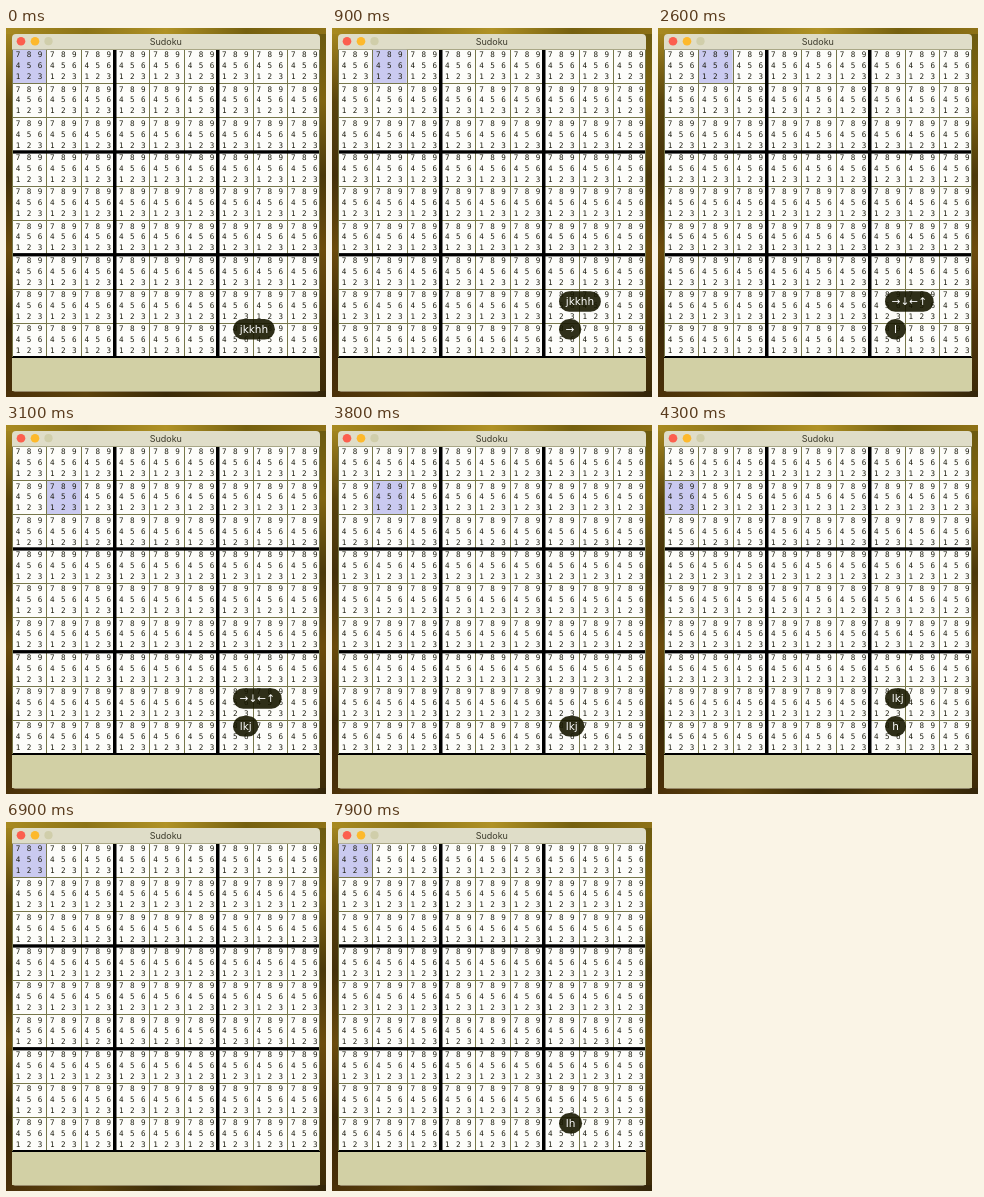
Write an HTML page with a canvas that moves like this. It is 320x369 px and loops after 8 s.

```html
<!DOCTYPE html>
<html lang="en">
<head>
<meta charset="utf-8">
<title>Sudoku</title>
<style>
  html, body { margin: 0; width: 100%; height: 100%; overflow: hidden; }
  canvas { display: block; }
</style>
</head>
<body>
<canvas id="stage" width="320" height="369"></canvas>
<script>
const ctx = document.getElementById('stage').getContext('2d');
const LOOP = 8000, HOLD = 1500, FADE = 300;
const PITCH_X = 34.4, PITCH_Y = 34.25;

// Each group of key presses shares one bubble: [key, time in ms].
const groups = [
  [...'jkkhh'].map(key => [key, -600]),
  [['→', 900], ['↓', 1150], ['←', 1400], ['↑', 1650]],
  [['l', 2400], ['k', 2700], ['j', 3000]],
  [['h', 4200], ['k', 4800]],
  [['l', 7400], ['h', 7700]]
];
const moves = {
  h: [-1, 0], j: [0, 1], k: [0, -1], l: [1, 0],
  '←': [-1, 0], '↓': [0, 1], '↑': [0, -1], '→': [1, 0]
};

function rect(x, y, w, h, fill) {
  ctx.fillStyle = fill;
  ctx.fillRect(x, y, w, h);
}

function dot(x, y, r, fill) {
  ctx.fillStyle = fill;
  ctx.beginPath();
  ctx.arc(x, y, r, 0, 2 * Math.PI);
  ctx.fill();
}

function text(str, x, y, font, fill, align = 'center') {
  ctx.font = font;
  ctx.fillStyle = fill;
  ctx.textAlign = align;
  ctx.textBaseline = 'alphabetic';
  ctx.fillText(str, x, y);
}

function gradient(x, y, ...colors) {
  const g = ctx.createLinearGradient(0, 0, x, y);
  colors.forEach((c, i) => g.addColorStop(i / (colors.length - 1), c));
  return g;
}

function drawBackdrop() {
  rect(0, 0, 160, 369, gradient(0, 369, '#a88a20', '#59440c', '#43300a', '#6a4b0c', '#3b2807', '#4a3009'));
  rect(160, 0, 160, 369, gradient(0, 369, '#6b5a10', '#80640f', '#4c390a', '#6c4b0c', '#503509', '#3b2a08'));
  rect(0, 0, 320, 6, gradient(320, 0, '#a88a20', '#8c7418', '#b09226', '#75600f', '#8d7116'));
  rect(0, 363, 320, 6, gradient(320, 0, '#4a3009', '#5d430c', '#3a2a08', '#553c0b', '#33250a'));
}

function drawWindow() {
  ctx.fillStyle = '#dfddc8';
  ctx.beginPath();
  ctx.roundRect(6, 6, 308, 357.5, [4, 4, 3, 3]);
  ctx.fill();
  rect(6, 330, 308, 33, '#d2d0a5');
  rect(6, 21, 308, 1, '#a9a786');
  dot(15, 13.2, 4.3, '#fc5f4e');
  dot(29, 13.2, 4.3, '#fdb92c');
  dot(42.5, 13.2, 4.1, '#d0ceaa');
  text('Sudoku', 159.8, 16.8, '9px Inter, sans-serif', '#3d3b2c');
}

function drawBoard([col, row]) {
  rect(6, 22, 308, 308, '#fdfdfa');
  rect(6.5 + col * PITCH_X, 21.8 + row * PITCH_Y, 33.8, 33.6, '#cacaf0');
  for (let i = 1; i < 9; i++) {
    if (i % 3 === 0) continue;
    rect(Math.round(5.8 + i * PITCH_X), 22, 1, 307, '#77774a');
    rect(7, Math.round(20.8 + i * PITCH_Y), 307, 1, '#77774a');
  }
  for (const i of [1, 2]) {
    rect(4 + i * 103, 22, 3.5, 307, '#000');
    rect(6, 19.5 + i * 102.8, 308, 3.3, '#000');
  }
  rect(6, 328, 308, 2, '#000');
  rect(6, 22, 1, 307, '#77774a');
  rect(313, 22, 1, 307, '#77774a');
  for (let r = 0; r < 9; r++) {
    for (let c = 0; c < 9; c++) {
      for (let n = 1; n <= 9; n++) {
        const x = 23 + c * PITCH_X + ((n - 1) % 3 - 1) * 11;
        const y = 37.4 + r * PITCH_Y + (1 - Math.floor((n - 1) / 3)) * 10.8;
        text(n, x, y + 2.8, '7.6px "DejaVu Sans Mono", monospace', '#1d1d10');
      }
    }
  }
}

function drawBubble(label, cy, alpha) {
  const font = '10.5px "DejaVu Sans", sans-serif';
  ctx.save();
  ctx.globalAlpha = alpha;
  ctx.font = font;
  const w = Math.max(21, ctx.measureText(label).width + 13.5);
  ctx.fillStyle = 'rgba(24, 24, 0, .9)';
  ctx.beginPath();
  ctx.roundRect(227, cy - 10.3, w, 20.6, 10.3);
  ctx.fill();
  text(label, 227 + w / 2, cy + 3.7, font, '#fff');
  ctx.restore();
}

function selectionAt(t) {
  let pos = [0, 0];
  for (const [key, at] of groups.flat()) {
    if (at < 0 || at > t) continue;
    pos = pos.map((p, i) => Math.min(8, Math.max(0, p + moves[key][i])));
  }
  return pos;
}

function drawBubbles(t) {
  const started = groups.map(g => g.filter(([, at]) => at <= t)).filter(g => g.length);
  started.reverse().forEach((keys, level) => {
    const age = t - keys[keys.length - 1][1];
    const alpha = Math.min(1, 1 - (age - HOLD) / FADE);
    if (alpha > 0) drawBubble(keys.map(([key]) => key).join(''), 301.2 - level * 27.7, alpha);
  });
}

function frame() {
  const t = performance.now() % LOOP;
  drawBackdrop();
  drawWindow();
  drawBoard(selectionAt(t));
  drawBubbles(t);
  requestAnimationFrame(frame);
}
frame();
</script>
</body>
</html>
```
